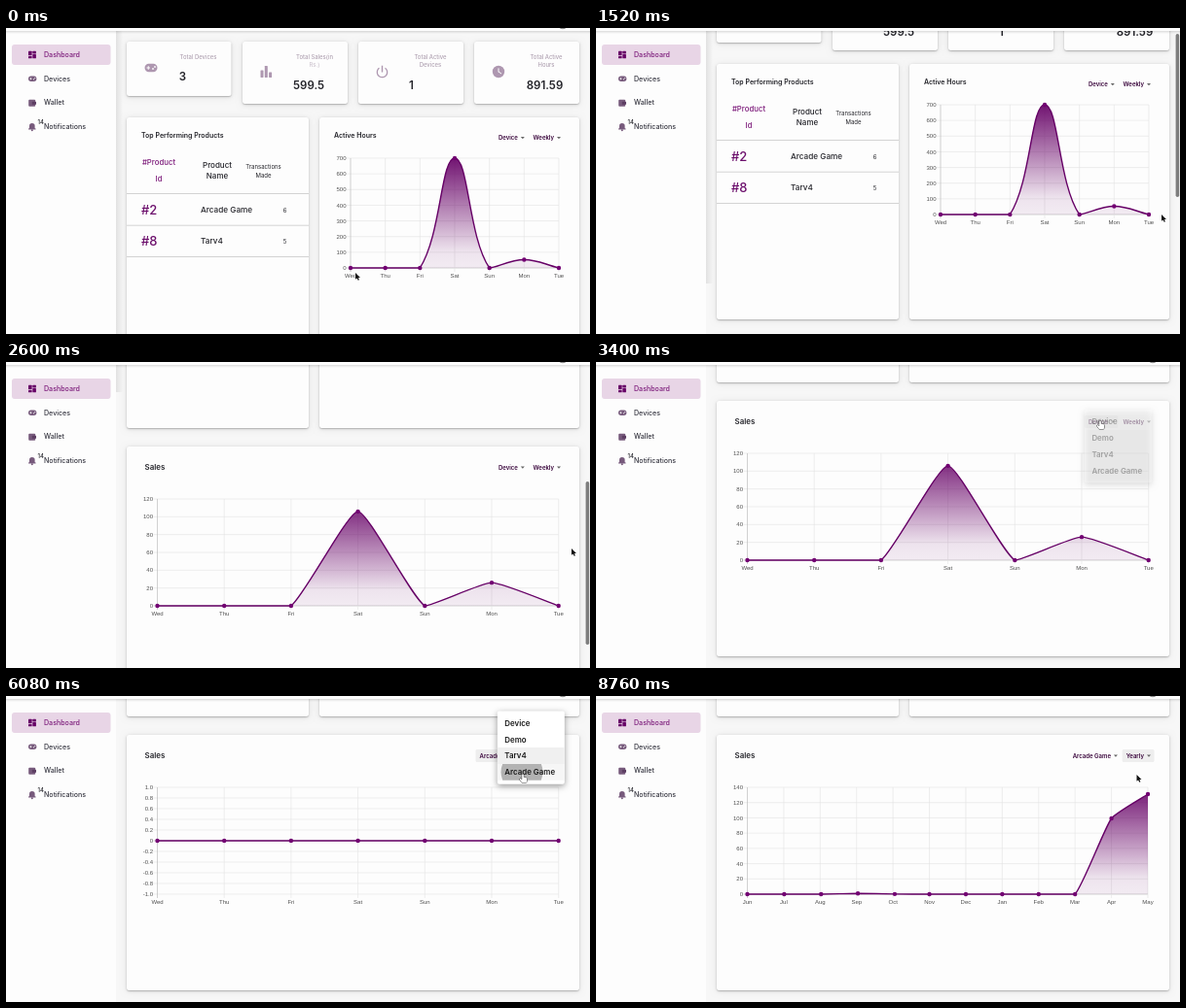
These frames come from a looping animation (600 px wide and 315 px high, 8800 ms). An HTML page with a canvas:

```html
<!DOCTYPE html>
<html lang="en">
<head>
<meta charset="utf-8">
<title>Dashboard</title>
<style>
html, body { margin: 0; width: 100%; height: 100%; overflow: hidden; background: #f7f7f7; }
canvas { display: block; width: 600px; height: 315px; }
</style>
</head>
<body>
<canvas id="stage"></canvas>
<script>
const LOOP = 8800;
const stage = document.getElementById('stage');
const ctx = stage.getContext('2d');
const dpr = window.devicePixelRatio || 1;
stage.width = 600 * dpr;
stage.height = 315 * dpr;

const PURPLE = '#660066', MAUVE = '#ae97b0', INK = '#24242a';
const UI = 'Inter, "Open Sans", sans-serif';
const AXIS = '"Liberation Sans", Arial, sans-serif';
const clamp = (v, lo, hi) => Math.min(hi, Math.max(lo, v));

// y is the middle of the capitals
function text(str, x, y, size, weight = 500, color = INK, align = 'left', family = UI) {
  ctx.font = `${weight} ${size}px ${family}`;
  ctx.textAlign = align;
  ctx.fillStyle = color;
  ctx.fillText(str, x, y + size * 0.36);
}

function box(x, y, w, h, r, color) {
  ctx.fillStyle = color;
  ctx.beginPath();
  ctx.roundRect(x, y, w, h, r);
  ctx.fill();
}

function disc(x, y, r, color) {
  ctx.fillStyle = color;
  ctx.beginPath();
  ctx.arc(x, y, r, 0, 7);
  ctx.fill();
}

function line(x1, y1, x2, y2, color, width = 0.6) {
  ctx.strokeStyle = color;
  ctx.lineWidth = width;
  ctx.beginPath();
  ctx.moveTo(x1, y1);
  ctx.lineTo(x2, y2);
  ctx.stroke();
}

function shadowed(alpha, blur, dy, draw) {
  ctx.save();
  ctx.shadowColor = `rgba(0,0,0,${alpha})`;
  ctx.shadowBlur = blur * dpr;
  ctx.shadowOffsetY = dy * dpr;
  draw();
  ctx.restore();
}

function card(x, y, w, h) {
  shadowed(0.1, 6, 1, () => box(x, y, w, h, 2.5, '#fdfdfd'));
  shadowed(0.3, 1.5, 0.8, () => box(x, y, w, h, 2.5, '#fdfdfd'));
}

// Smooth interpolation over rows of [time, value, ...]
function track(keys, t) {
  let i = keys.findIndex(k => k[0] > t);
  if (i < 0) return keys[keys.length - 1].slice(1);
  if (i === 0) return keys[0].slice(1);
  const a = keys[i - 1], b = keys[i];
  const u = (t - a[0]) / (b[0] - a[0]), e = u * u * (3 - 2 * u);
  return a.slice(1).map((v, n) => v + (b[n + 1] - v) * e);
}

// ---- charts ----
const DAYS = ['Wed', 'Thu', 'Fri', 'Sat', 'Sun', 'Mon', 'Tue'];
const MONTHS = ['Jun', 'Jul', 'Aug', 'Sep', 'Oct', 'Nov', 'Dec', 'Jan', 'Feb', 'Mar', 'Apr', 'May'];
const WEEKS = [17, 18, 19, 20, 21].map(n => 'week ' + n);
const HOURS = { labels: DAYS, values: [0, 0, 0, 700, 0, 53, 0], lo: 0, hi: 700, step: 100,
  left: 354, right: 568, top: 134, bottom: 247, tension: 0.4 };

const sales = (labels, values, lo, hi, step, right = 567.7) =>
  ({ labels, values, lo, hi, step, right, left: 155.5, top: 428, bottom: 538, tension: 0.15 });
const WEEKLY = sales(DAYS, [0, 0, 0, 106, 0, 26, 0], 0, 120, 20);
const FLAT = sales(DAYS, DAYS.map(() => 0), -1, 1, 0.2);
const MONTHLY = sales(WEEKS, [0, 0, 0, 106, 26], 0, 120, 20, 561.3);
const YEARLY = sales(MONTHS, MONTHS.map((m, i) => [100, 132][i - 10] || 0), 0, 140, 20, 567);

const DEVICES = ['Device', 'Demo', 'Tarv4', 'Arcade Game'];
const PERIODS = ['Weekly', 'Monthly', 'Yearly'];

// Selections over time: indexes into DEVICES and PERIODS, and the chart shown
const STATES = [
  { at: -5000, device: 0, period: 0, chart: WEEKLY },
  { at: 3760, device: 1, period: 0, chart: FLAT },
  { at: 5280, device: 2, period: 0, chart: FLAT },
  { at: 6040, device: 3, period: 0, chart: WEEKLY },
  { at: 6560, device: 3, period: 1, chart: MONTHLY },
  { at: 8000, device: 3, period: 2, chart: YEARLY }
];
const stateAt = t => STATES.findLastIndex(s => s.at <= t);
const DELAY = 50;

const yOf = (c, v) => c.bottom - (v - c.lo) / (c.hi - c.lo) * (c.bottom - c.top);
const xOf = (c, i) => c.left + (c.right - c.left) * i / (c.labels.length - 1);
const restPoints = c => c.values.map((v, i) => ({ x: xOf(c, i), y: yOf(c, v) }));

// Points glide from wherever they were, easing out over one second
function salesPoints(n, t) {
  const { chart, at } = STATES[n];
  const rest = restPoints(chart);
  const left = (1 - clamp((t - at - DELAY) / 1000, 0, 1)) ** 4;
  if (n === 0 || left === 0) return rest;
  const from = salesPoints(n - 1, at + DELAY);
  return rest.map((p, i) => {
    const a = from[i] || { x: p.x, y: chart.bottom };
    return { x: p.x + (a.x - p.x) * left, y: p.y + (a.y - p.y) * left };
  });
}

function curve(c, pts) {
  const ctrl = pts.map((p, i) => {
    const a = pts[i - 1] || p, b = pts[i + 1] || p;
    const da = Math.hypot(p.x - a.x, p.y - a.y), db = Math.hypot(b.x - p.x, b.y - p.y);
    const at = f => ({
      x: clamp(p.x + f * (b.x - a.x), c.left, c.right),
      y: clamp(p.y + f * (b.y - a.y), c.top, c.bottom)
    });
    const sum = da + db || 1;
    return { before: at(-c.tension * da / sum), after: at(c.tension * db / sum) };
  });
  ctx.beginPath();
  ctx.moveTo(pts[0].x, pts[0].y);
  for (let i = 1; i < pts.length; i++) {
    const a = ctrl[i - 1].after, b = ctrl[i].before;
    ctx.bezierCurveTo(a.x, a.y, b.x, b.y, pts[i].x, pts[i].y);
  }
}

function chart(c, pts, firstDot = true) {
  const rows = Math.round((c.hi - c.lo) / c.step);
  for (let i = 0; i <= rows; i++) {
    const v = c.lo + i * c.step, y = yOf(c, v), zero = Math.abs(v) < 1e-6;
    line(c.left - 4, y, c.right, y, zero ? '#b4b4b4' : '#e2e2e2');
    const label = zero ? '0' : c.lo < 0 ? v.toFixed(1) : String(v);
    text(label, c.left - 4.5, y, 6, 400, '#505050', 'right', AXIS);
  }
  c.labels.forEach((label, i) => {
    const x = xOf(c, i);
    line(x, c.top, x, c.bottom + 4, i ? '#e2e2e2' : '#b4b4b4');
    text(label, x, c.bottom + 8.2, 6, 400, '#505050', 'center', AXIS);
  });

  const base = yOf(c, 0);
  const shade = ctx.createLinearGradient(0, c.top, 0, c.bottom);
  shade.addColorStop(0, 'rgba(102,0,102,.92)');
  shade.addColorStop(0.85, 'rgba(102,0,102,.1)');
  shade.addColorStop(1, 'rgba(102,0,102,.07)');
  curve(c, pts);
  ctx.lineTo(pts[pts.length - 1].x, base);
  ctx.lineTo(pts[0].x, base);
  ctx.fillStyle = shade;
  ctx.fill();
  curve(c, pts);
  ctx.strokeStyle = PURPLE;
  ctx.lineWidth = 1.4;
  ctx.stroke();
  pts.forEach((p, i) => { if (i || firstDot) disc(p.x, p.y, 2.2, '#720072'); });
}

// ---- selects and menus ----
function width(str, size) {
  ctx.font = `600 ${size}px ${UI}`;
  return ctx.measureText(str).width;
}

function arrow(x, y) {
  ctx.fillStyle = '#666';
  ctx.beginPath();
  ctx.moveTo(x - 2, y - 0.9);
  ctx.lineTo(x + 2, y - 0.9);
  ctx.lineTo(x, y + 1.2);
  ctx.fill();
}

// Left text edges of the device and period selects
function selectEdges(state) {
  const period = 563 - width(PERIODS[state.period], 6);
  return [period - 15.7 - width(DEVICES[state.device], 6), period];
}

function selects(state, y, focus = -1) {
  const edges = selectEdges(state);
  const arrows = [edges[1] - 10.7, 568];
  [DEVICES[state.device], PERIODS[state.period]].forEach((label, i) => {
    if (i === focus) box(edges[i] - 4, y - 6.5, arrows[i] - edges[i] + 9.5, 13, 1.5, '#eeeeee');
    text(label, edges[i], y, 6, 600, '#3a063c');
    arrow(arrows[i], y);
  });
}

// kind: 0 device, 1 period
const MENUS = [
  { open: 3360, pick: 3760, kind: 0 },
  { open: 4840, pick: 5280, kind: 0 },
  { open: 5680, pick: 6040, kind: 0 },
  { open: 6260, pick: 6560, kind: 1 },
  { open: 7480, pick: 8000, kind: 1 }
];
const ROW = 16.8, HOLD = 80, FADE = 150;

function menu({ open, pick, kind }, t, cursor) {
  const state = STATES[stateAt(open)];
  const items = kind ? PERIODS : DEVICES;
  const chosen = kind ? state.period : state.device;
  const x = selectEdges(state)[kind] - 4, w = kind ? 49 : 69;
  const y = 61.5 - 4 - ROW * (chosen + 0.5), rowY = i => y + 4 + ROW * i;
  ctx.save();
  ctx.globalAlpha = Math.min(1, (t - open) / 120, (pick + HOLD + FADE - t) / FADE);
  shadowed(0.4, 6, 2, () => box(x, y, w, items.length * ROW + 8, 2, '#fff'));
  const hover = Math.floor((cursor[1] - y - 4) / ROW);
  items.forEach((item, i) => {
    if (i === chosen) box(x, rowY(i), w, ROW, 0, '#f0f0f0');
    else if (i === hover) box(x, rowY(i), w, ROW, 0, '#f6f6f6');
    if (i === chosen + 1 && t >= pick) {
      ctx.save();
      ctx.beginPath();
      ctx.rect(x, rowY(i), w, ROW);
      ctx.clip();
      disc(cursor[0] - 1, rowY(i) + ROW / 2, 10 + (t - pick) * 0.28, 'rgba(0,0,0,.28)');
      ctx.restore();
    }
    text(item, x + 7.5, rowY(i) + ROW / 2, 7.9, 600, '#1c1c1c');
  });
  ctx.restore();
}

// ---- icons ----
function gamepad(x, y, k, color, hole) {
  box(x - 6.5 * k, y - 4.3 * k, 13 * k, 8.6 * k, 4.2 * k, color);
  line(x - 4.5 * k, y, x - 1 * k, y, hole, k);
  line(x - 2.75 * k, y - 1.8 * k, x - 2.75 * k, y + 1.8 * k, hole, k);
  disc(x + 2 * k, y + k, 0.9 * k, hole);
  disc(x + 4 * k, y - k, 0.9 * k, hole);
}

function power(x, y) {
  ctx.strokeStyle = MAUVE;
  ctx.lineWidth = 1.3;
  ctx.beginPath();
  ctx.arc(x, y + 0.5, 5.2, -0.95, Math.PI + 0.95);
  ctx.stroke();
  line(x, y - 6.3, x, y + 0.5, MAUVE, 1.4);
}

function clock(x, y) {
  disc(x, y, 6.2, MAUVE);
  line(x, y - 3.6, x, y + 0.4, '#fdfdfd', 1);
  line(x, y, x + 3, y + 2, '#fdfdfd', 1);
}

function bell(x, y, color) {
  box(x - 2.8, y - 3.6, 5.6, 6, [2.8, 2.8, 0, 0], color);
  box(x - 3.8, y + 1.6, 7.6, 1.3, 0.6, color);
  disc(x, y + 3.5, 1, color);
}

// ---- page ----
function sidebar() {
  box(0, 0, 113, 315, 0, '#fdfdfd');
  box(6, 17, 101.5, 21, 3, '#e8d5e6');
  box(23, 23.8, 3.6, 4.4, 0.5, PURPLE);
  box(27.3, 23.8, 3.6, 2.6, 0.5, PURPLE);
  box(23, 28.9, 3.6, 2.4, 0.5, PURPLE);
  box(27.3, 27.1, 3.6, 4.2, 0.5, PURPLE);
  const icon = '#775a7c';
  gamepad(27.2, 52.2, 0.64, icon, '#fdfdfd');
  box(23.2, 73.8, 7, 7, 1, icon);
  box(26.8, 75.8, 4.2, 3, 0.6, '#5c3d62');
  bell(26.8, 101.7, icon);
  text('14', 32.4, 97.2, 6, 500);
  text('Dashboard', 39, 27.5, 7.1, 500, '#7c1a7a');
  ['Devices', 'Wallet', 'Notifications'].forEach((s, i) => text(s, 39, 52.2 + i * 24.7, 7.1, 500, '#34343f'));
}

function stats() {
  card(124, 14, 107.5, 56);
  for (const x of [243, 362, 481]) card(x, 14, 108, 64);
  gamepad(149, 41, 1, MAUVE, '#fdfdfd');
  box(261.5, 43.5, 3, 7.5, 0.4, MAUVE);
  box(265.8, 39, 3, 12, 0.4, MAUVE);
  box(270.1, 45.5, 3, 5.5, 0.4, MAUVE);
  power(386.5, 45);
  clock(506, 45);
  const label = (s, x, y, c = '#b1a3b3') => text(s, x, y, 5.9, 500, c, 'center');
  label('Total Devices', 197.5, 30);
  label('Total Sales(in', 317, 30);
  label('Rs.)', 317, 38.3, '#cfc6d0');
  label('Total Active', 436, 30);
  label('Devices', 436, 38.3);
  label('Total Active', 555, 30);
  label('Hours', 555, 38.3);
  const figure = (s, x, y) => text(s, x, y, 11.5, 600, INK, 'center');
  figure('3', 181.5, 50);
  figure('599.5', 311, 58.5);
  figure('1', 416.5, 58.5);
  figure('891.59', 553.5, 58.5);
}

function products() {
  card(124, 92, 187, 263);
  text('Top Performing Products', 139, 110.5, 7, 600);
  text('#Product', 157, 138, 7.8, 500, '#7c1a7a', 'center');
  text('Id', 157, 154.8, 7.6, 500, '#7c1a7a', 'center');
  text('Product', 217, 140.7, 8, 500, INK, 'center');
  text('Name', 217, 151.8, 8, 500, INK, 'center');
  text('Transactions', 264.5, 143, 6, 400, INK, 'center');
  text('Made', 264.5, 151.5, 6, 400, INK, 'center');
  [['#2', 'Arcade Game', '6'], ['#8', DEVICES[2], '5']].forEach(([id, name, count], i) => {
    const y = 187 + i * 32.3;
    text(id, 139, y, 13, 500, '#6c0f6c');
    text(name, 200, y, 8.2, 500);
    text(count, 286.5, y + 1, 6, 400, INK, 'center');
  });
  for (const y of [170.5, 203.2, 235.5]) line(124, y, 311, y, '#c9c9c9', 0.8);
}

function page(t, scroll) {
  ctx.save();
  ctx.translate(0, -scroll);
  stats();
  products();
  card(322, 92, 267, 263);
  text('Active Hours', 337, 110.5, 7, 600);
  selects(STATES[0], 113);
  chart(HOURS, restPoints(HOURS));

  const now = STATES[stateAt(t)], shown = stateAt(t - DELAY);
  const used = MENUS.filter(m => m.open <= t).pop();
  card(124, 374, 465, 263);
  text('Sales', 142.5, 395.5, 7.9, 600);
  selects(now, 395.5, used ? used.kind : -1);
  chart(STATES[shown].chart, salesPoints(shown, t), shown !== 1);
  ctx.restore();
}

// ---- pointer ----
const POINTER = [
  [0, 359, 252], [900, 581, 192], [2900, 581, 192], [3300, 518, 60], [3420, 518, 60],
  [3700, 522, 77], [3820, 522, 77], [4300, 563, 93], [4500, 563, 93], [4780, 520, 60],
  [4880, 520, 60], [5200, 522, 77], [5320, 522, 77], [5620, 515, 60], [5720, 515, 60],
  [5960, 531, 80], [6100, 531, 80], [6220, 553, 60], [6290, 553, 60], [6500, 555, 77],
  [6620, 555, 77], [7000, 551, 79], [7400, 551, 79], [7470, 553, 62], [7520, 553, 62],
  [7760, 556, 78], [8060, 556, 78], [8300, 555.5, 81]
];
const SCROLL = [[960, 0], [1520, 55], [2050, 175], [2600, 287], [3000, 334]];

const ARROW = new Path2D('M0 0V6.8L1.6 5.4L2.7 7.8L3.9 7.3L2.9 5H5Z');
const HAND = new Path2D('M-.8 .8Q0-.4.8 .8V3.6L3.6 4.3Q4.6 4.6 4.4 5.8L3.7 9H-1.2L-3.4 5.7Q-3.3 4.5-2 5.2L-.8 6Z');

function pointer([x, y], hand) {
  ctx.save();
  ctx.translate(x, y);
  ctx.lineJoin = 'round';
  ctx.lineWidth = hand ? 0.8 : 1;
  ctx.strokeStyle = hand ? '#111' : '#fff';
  ctx.fillStyle = hand ? '#fff' : '#111';
  const path = hand ? HAND : ARROW;
  ctx.stroke(path);
  ctx.fill(path);
  ctx.restore();
}

function draw(t) {
  ctx.setTransform(dpr, 0, 0, dpr, 0, 0);
  box(0, 0, 600, 315, 0, '#f7f7f7');
  const [scroll] = track(SCROLL, t);
  const cursor = track(POINTER, t);

  const edge = ctx.createLinearGradient(113, 0, 120, 0);
  edge.addColorStop(0, 'rgba(0,0,0,.09)');
  edge.addColorStop(1, 'rgba(0,0,0,0)');
  box(113, 0, 7, Math.max(0, 318 - scroll), 0, edge);
  page(t, scroll);
  sidebar();

  const under = ctx.createLinearGradient(0, 3, 0, 6);
  under.addColorStop(0, 'rgba(0,0,0,.13)');
  under.addColorStop(1, 'rgba(0,0,0,0)');
  box(0, 3, 600, 3, 0, under);
  box(0, 0, 600, 3, 0, '#fdfdfd');
  if (t < 960 || t >= 1860) {
    ctx.strokeStyle = '#777';
    ctx.lineWidth = 0.9;
    ctx.beginPath();
    ctx.arc(572, -6.5, 7, 0.9, Math.PI - 0.9);
    ctx.stroke();
  }
  if (t >= 960 && t < 3200) {
    ctx.globalAlpha = clamp((3200 - t) / 200, 0, 1);
    box(595.6, 6 + (scroll - 55) * 0.504, 3.6, 168, 1.8, '#7d7d7d');
    ctx.globalAlpha = 1;
  }

  const open = MENUS.filter(m => t >= m.open && t < m.pick + HOLD + FADE);
  open.forEach(m => menu(m, t, cursor));
  pointer(cursor, open.some(m => t < m.pick + HOLD) || (t > 3200 && cursor[1] < 67));
}

const start = performance.now();
function frame() {
  draw((performance.now() - start) % LOOP);
  requestAnimationFrame(frame);
}
frame();
</script>
</body>
</html>
```
